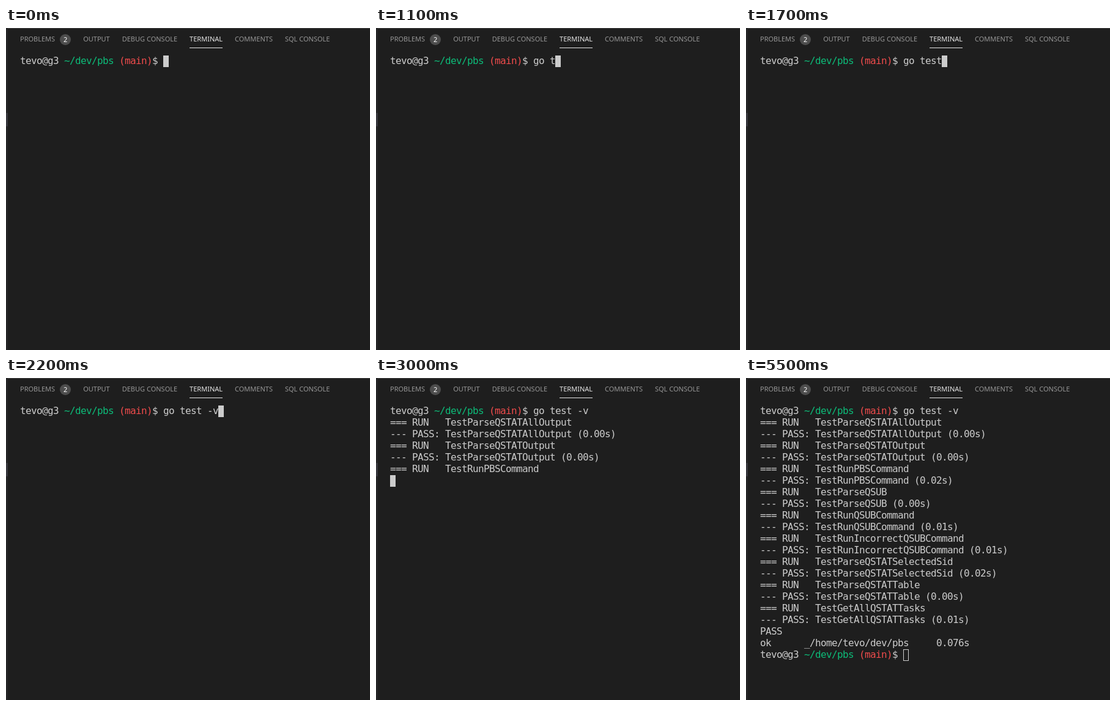
An HTML page that plays this animation: 595x527 px, repeating every 5.6 s.

```html
<!DOCTYPE html>
<html lang="en">
<head>
<meta charset="utf-8">
<title>Terminal test run</title>
<style>
  @property --typed { syntax: "<integer>"; inherits: true; initial-value: 0; }
  @property --col   { syntax: "<integer>"; inherits: true; initial-value: 26; }
  @property --row   { syntax: "<integer>"; inherits: true; initial-value: 0; }
  @property --shown { syntax: "<integer>"; inherits: true; initial-value: 0; }

  html, body {
    margin: 0;
    width: 100%;
    height: 100%;
    overflow: hidden;
    background: #1e1e1e;
  }
  .stage {
    position: relative;
    width: 595px;
    height: 527px;
    overflow: hidden;
  }
  .edge, .edge::after, .rule { position: absolute; left: 0; width: 3px; }
  .edge { top: 0; height: 527px; background: #252526; }
  .edge::after { content: ""; top: 139px; height: 22px; background: #37373d; }
  .rule { left: 3px; top: 0; width: 592px; height: 1px; background: #414141; }

  .tabs {
    position: absolute;
    left: 23px;
    top: 10px;
    display: flex;
    gap: 20px;
    align-items: flex-start;
    font: 11px/15px "Noto Sans", sans-serif;
    color: #979797;
    white-space: nowrap;
  }
  .tabs > span { position: relative; display: flex; }
  .tabs .active { color: #e7e7e7; }
  .active::after {
    content: "";
    position: absolute;
    left: 0;
    right: 0;
    top: 22px;
    height: 1px;
    background: #e7e7e7;
  }
  .badge {
    box-sizing: border-box;
    width: 18px;
    height: 18px;
    margin: 0 0 -3px 8px;
    padding: 3px 0;
    border-radius: 50%;
    background: #4d4d4d;
    color: #fff;
    line-height: 11px;
    text-align: center;
  }

  .term {
    --w: 9px;
    --h: 19px;
    position: absolute;
    left: 23px;
    top: 44px;
    font: 16px/19px "DejaVu Sans Mono", monospace;
    letter-spacing: calc(var(--w) - 1ch);
    font-variant-ligatures: none;
    color: #ccc;
    white-space: pre;
    animation: session 5600ms step-end infinite;
  }
  .line { height: var(--h); }
  .path { color: #0dbc79; }
  .branch { color: #f14c4c; }
  .command {
    position: absolute;
    left: calc(26 * var(--w));
    top: 0;
    width: calc(var(--typed) * var(--w));
    height: var(--h);
    overflow: hidden;
  }
  .output {
    width: 560px;
    height: calc(var(--shown) * var(--h));
    overflow: hidden;
  }
  .cursor {
    position: absolute;
    box-sizing: border-box;
    left: calc(var(--col) * var(--w));
    top: calc(var(--row) * var(--h) + 1px);
    width: var(--w);
    height: var(--h);
    border: 1px solid #ccc;
    background: #ccc;
    animation: blur 5600ms step-end infinite;
  }

  @keyframes session {
    0%       { --typed: 0; --col: 26; --row: 0;  --shown: 0; }
    8.928%   { --typed: 1; --col: 27; }
    14.285%  { --typed: 2; --col: 28; }
    16.071%  { --typed: 3; --col: 29; }
    19.642%  { --typed: 4; --col: 30; }
    25%      { --typed: 5; --col: 31; }
    26.785%  { --typed: 6; --col: 32; }
    30.357%  { --typed: 7; --col: 33; }
    32.142%  { --typed: 8; --col: 34; }
    39.285%  { --typed: 10; --col: 36; }
    50%      { --typed: 10; --col: 0; --row: 1;  --shown: 0; }
    53.571%  { --typed: 10; --col: 0; --row: 6;  --shown: 5; }
    55.357%, 100% { --typed: 10; --col: 26; --row: 21; --shown: 21; }
  }
  @keyframes blur {
    0% { background: #ccc; }
    98.214%, 100% { background: transparent; }
  }
</style>
</head>
<body>
<div class="stage">
  <div class="edge"></div>
  <div class="rule"></div>
  <div class="tabs">
    <span>PROBLEMS<b class="badge" style="font-weight:400">2</b></span>
    <span>OUTPUT</span>
    <span>DEBUG CONSOLE</span>
    <span class="active">TERMINAL</span>
    <span>COMMENTS</span>
    <span>SQL CONSOLE</span>
  </div>
  <div class="term"><div class="line">tevo@g3 <span class="path">~/dev/pbs</span> <span class="branch">(main)</span>$ </div><div class="command">go test -v</div><div class="output">=== RUN   TestParseQSTATAllOutput
--- PASS: TestParseQSTATAllOutput (0.00s)
=== RUN   TestParseQSTATOutput
--- PASS: TestParseQSTATOutput (0.00s)
=== RUN   TestRunPBSCommand
--- PASS: TestRunPBSCommand (0.02s)
=== RUN   TestParseQSUB
--- PASS: TestParseQSUB (0.00s)
=== RUN   TestRunQSUBCommand
--- PASS: TestRunQSUBCommand (0.01s)
=== RUN   TestRunIncorrectQSUBCommand
--- PASS: TestRunIncorrectQSUBCommand (0.01s)
=== RUN   TestParseQSTATSelectedSid
--- PASS: TestParseQSTATSelectedSid (0.02s)
=== RUN   TestParseQSTATTable
--- PASS: TestParseQSTATTable (0.00s)
=== RUN   TestGetAllQSTATTasks
--- PASS: TestGetAllQSTATTasks (0.01s)
PASS
ok      _/home/tevo/dev/pbs     0.076s
tevo@g3 <span class="path">~/dev/pbs</span> <span class="branch">(main)</span>$ </div><div class="cursor"></div></div>
</div>
</body>
</html>
```
